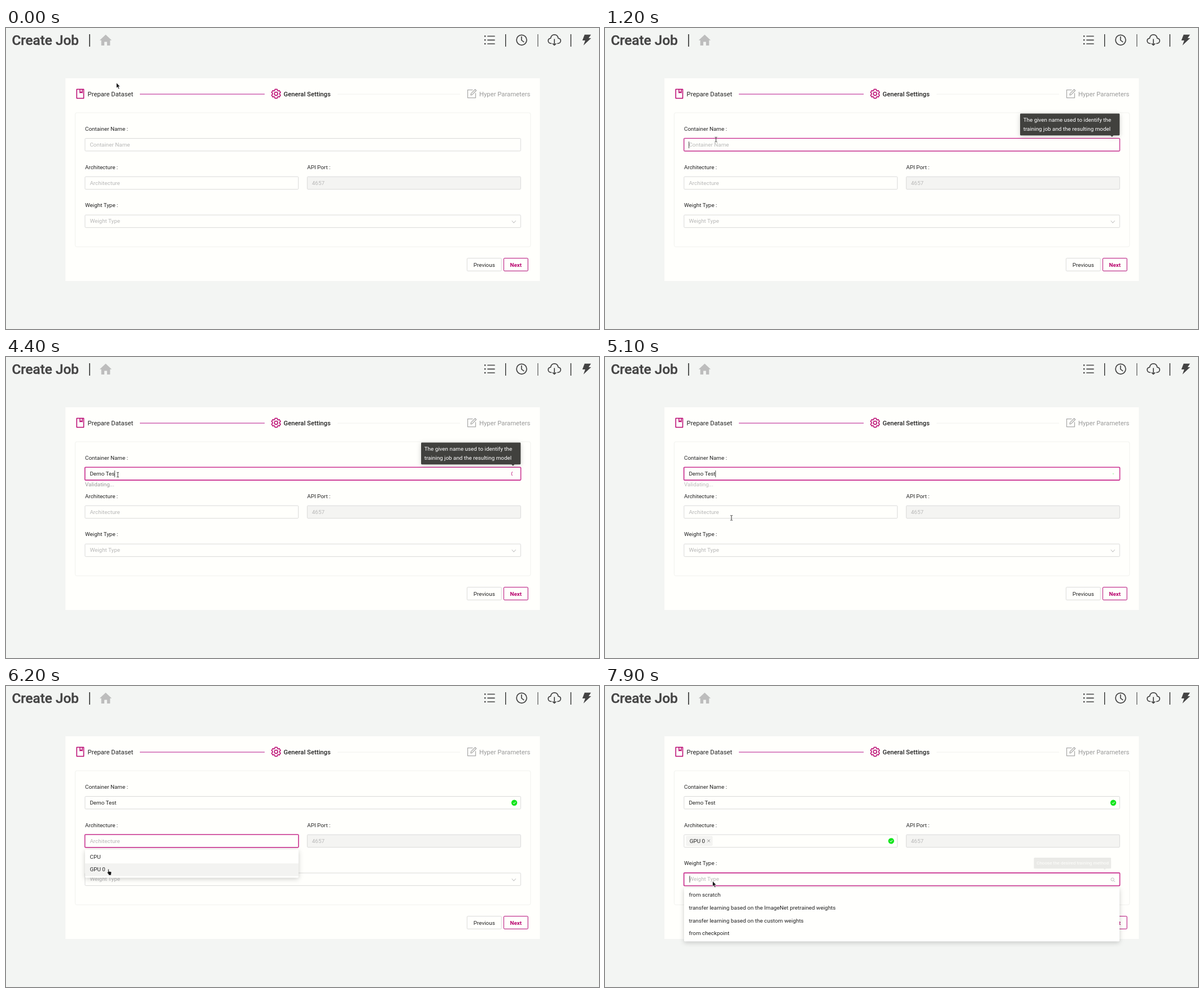
An HTML page that plays this animation: 1050 by 533 pixels, repeating every 8 s.

```html
<!DOCTYPE html>
<html lang="en">
<head>
<meta charset="utf-8">
<title>Create Job</title>
<style>
html, body { margin: 0; width: 100%; height: 100%; overflow: hidden; background: #f3f5f3; }
svg { display: block; width: 100vw; height: 100vh; font: 9.87px Roboto, sans-serif; fill: #222; }
.step { font-size: 11.28px; }
.bold { font-weight: 500; }
.hint { fill: #b8b8b8; }
.box { fill: #fffffc; stroke: #d6d6d6; stroke-width: .9; }
.pink { fill: none; stroke: #bf1280; }
.ring { fill: none; stroke: #cf3d97; stroke-width: 1.4; }
.line { fill: none; stroke: #444; stroke-width: 1.7; stroke-linejoin: round; stroke-linecap: round; }
.tip { fill: #41413e; filter: drop-shadow(0 2px 4px rgba(0,0,0,.18)); }
.tipText { fill: #fff; }
.menu { fill: #fffffd; filter: drop-shadow(0 2px 4px rgba(0,0,0,.2)); }
.caret { stroke: #222; stroke-width: .8; }
.pointer { stroke: #fff; stroke-width: .6; fill: #111; }
</style>
</head>
<body>
<svg id="stage" viewBox="0 0 1050 533"></svg>
<script>
const LOOP = 8000, LAST = 7900, STEP = 50;
const LEFT = 148.4;

const text = (x, y, s, cls = '') => `<text x="${x}" y="${y}" class="${cls}">${s}</text>`;
const rect = (x, y, w, h, cls, rx = 1.4) =>
  `<rect x="${x}" y="${y}" width="${w}" height="${h}" rx="${rx}" class="${cls}"/>`;

const field = (id, x, y, w) => rect(x, y, w, 22.3, 'box') +
  `<g id="${id}Hover">${rect(x, y, w, 22.3, 'pink')}</g>` +
  `<g id="${id}Focus" opacity="0">${rect(x - .4, y - .4, w + .8, 23.1, 'ring')}</g>`;

const check = (id, x, y) => `<g id="${id}" data-x="${x}" data-y="${y}">
  <circle cx="${x}" cy="${y}" r="5.2" fill="#12e51c"/>
  <path d="M${x - 2.1} ${y}l1.6 1.8 2.8-3.4" fill="none" stroke="#fff" stroke-width="1"/></g>`;

const tooltip = (id, x, y, w, h, lines) => `<g id="${id}" data-x="${x + w / 2}" data-y="${y + h / 2}">
  <path class="tip" d="M${x + 1.4} ${y}h${w - 2.8}q1.4 0 1.4 1.4v${h - 2.8}q0 1.4-1.4 1.4h-9.6l-2.6 2.6-2.6-2.6H${x + 1.4}q-1.4 0-1.4-1.4v${2.8 - h}q0-1.4 1.4-1.4z"/>
  ${lines.map((s, i) => text(x + 5.7, y + 14.7 + 15.5 * i, s, 'tipText')).join('')}</g>`;

const menu = (id, y, w, items, extra = '') => `<g id="${id}" data-y="${y}">
  ${rect(140, y, w, items.length * 22.55 + 4.4, 'menu')}${extra}
  ${items.map((s, i) => text(148.6, y + 15.8 + 22.55 * i, s)).join('')}</g>`;

// Six-toothed outline around the origin
const gear = () => {
  const points = [];
  for (let i = 0; i < 6; i++)
    for (const [turn, r] of [[-22, 6.3], [-14, 8.2], [14, 8.2], [22, 6.3]]) {
      const a = (i * 60 + turn - 90) * Math.PI / 180;
      points.push((r * Math.cos(a)).toFixed(2) + ',' + (r * Math.sin(a)).toFixed(2));
    }
  return `<polygon points="${points.join(' ')}"/><circle r="2.9"/>`;
};

const header = `
  <text x="10.4" y="30.4" font-size="24.3" class="bold" fill="#444" stroke="#444" stroke-width=".4">Create Job</text>
  <g fill="#222"><path d="M147.3 11h1.5v22h-1.5zM884 11h1.3v22h-1.3zM941.4 11h.9v22h-.9zM999.6 11h1.3v22h-1.3z"/></g>
  <path d="M176.5 11.8l10.6 10h-2.8v9.2h-5.4v-6.4h-4.8V31h-5.4v-9.2h-2.8z" fill="#bdbdbd"/>
  <g class="line">
    <path d="M853 14.5h12M853 21.3h12M853 28h12"/>
    <path d="M848 14.5h.4M848 21.3h.4M848 28h.4" stroke-width="2.4"/>
    <circle cx="913" cy="21.3" r="9"/><path d="M912.8 15.6v6l4 3"/>
    <path d="M965.6 27.5c-7-.4-7.300-8.400-1.200-9.400 1.600-8.200 11.800-8.200 13.400 0 6.100 1 5.800 9-1.200 9.400M971 20v10.300M968.300 27.800l2.700 2.700 2.700-2.700"/>
  </g>
  <path d="M1024.500 11.800h11.300l-4.200 6.100h4.500l-13.600 12.800 3.100-8.600h-5z" fill="#444"/>`;

const steps = `
  <g class="line" style="stroke:#b9056f;stroke-width:1.5">
    <path d="M125.300 108.500h12.300v15.900h-12.300zM131 108.500v6.300l2-1.500 2 1.500v-6.300"/>
    <g transform="translate(478.200 116.500)">${gear()}</g>
  </g>
  <path d="M237 117.200h221" stroke="#c545a2" stroke-width="1.200"/>
  <path d="M587 117.200h217" stroke="#f1f1ee"/>
  <path class="line" style="stroke:#aaa;stroke-width:1.300" d="M826 109.700h-8.500v14h14v-8M823 118.800l.4-2.700 7.300-7.300 2 2-7.300 7.300z"/>
  ${text(144.6, 121, 'Prepare Dataset', 'step')}
  ${text(491.5, 121, 'General Settings', 'step bold')}
  <g fill="#999">${text(838, 121, 'Hyper Parameters', 'step')}</g>`;

const form = `
  <rect x="122.500" y="150" width="806.300" height="237.500" rx="3" fill="none" stroke="#f1f2ee"/>
  ${text(140, 181.7, 'Container Name :')}${text(140, 249.5, 'Architecture :')}
  ${text(533.3, 249.5, 'API Port :')}${text(140, 317.4, 'Weight Type :')}
  ${field('name', 139.9, 195.5, 771.4)}
  ${field('arch', 139.9, 263.3, 377.8)}
  <rect x="533.400" y="263.300" width="377.900" height="22.300" rx="1.400" class="box" style="fill:#f4f4f2"/>
  ${field('weight', 139.9, 331.1, 771.4)}
  ${text(LEFT, 210, 'Container Name', 'hint')}
  <text id="typed" x="${LEFT}" y="210"></text>
  <g id="archHint">${text(LEFT, 277.8, 'Architecture', 'hint')}</g>
  ${text(541.8, 277.8, '4657', 'hint')}
  ${text(LEFT, 345.4, 'Weight Type', 'hint')}
  <path id="chevron" d="M895.800 341.200l3.400 4 3.400-4" fill="none" stroke="#b5b5b5"/>
  <path id="search" d="M900.700 344.700l2.200 2.200M901.300 342.500a2.700 2.700 0 1 1-5.400 0 2.700 2.700 0 1 1 5.400 0" fill="none" stroke="#b5b5b5" stroke-width=".9"/>
  <g id="tag">${rect(144, 266, 46, 16.6, 'chip')}${text(149.8, 277.7, 'GPU 0')}
    <path d="M181.300 271.900l4.600 4.600M185.900 271.900l-4.600 4.600" stroke="#777" stroke-width=".8"/></g>
  <circle id="spinner" cx="900" cy="206.700" r="4.800" fill="none" stroke="#c8388f" stroke-width="1" stroke-dasharray="7.540 30"/>
  <g id="validating" fill="#999">${text(140, 229, 'Validating...')}</g>
  ${check('nameCheck', 900, 206.8)}${check('archCheck', 506.7, 274.4)}
  <path id="nameCaret" class="caret" d="M0 201v12"/>
  <path id="weightCaret" class="caret" d="M150 336v12"/>
  ${rect(816.400, 407.700, 60.800, 22.500, 'box')}${text(827.8, 422.5, 'Previous')}
  ${rect(881.400, 407.700, 42.800, 22.500, 'box')}${rect(881.400, 407.700, 42.800, 22.500, 'pink')}
  <g fill="#b9056f" font-weight="700">${text(892.5, 422.5, 'Next')}</g>`;

const overlays =
  tooltip('nameTip', 735, 151.5, 176.3, 38.7, ['The given name used to identify the', 'training job and the resulting model']) +
  tooltip('weightTip', 744.5, 302, 166.5, 23.4, ['Choose the desired training method']) +
  menu('archMenu', 290, 378, ['CPU', 'GPU 0'], '<rect id="active" x="140" width="378" height="22.500" fill="#f3f3f1"/>') +
  menu('weightMenu', 357.6, 771, ['from scratch', 'transfer learning based on the ImageNet pretrained weights',
    'transfer learning based on the custom weights', 'from checkpoint']);

const cursors = `<g id="cursor">
  <path id="arrow" class="pointer" d="M0 0v9.300l2.100-1.900 1.700 3.700 1.600-.7-1.700-3.600h2.900z"/>
  <path id="beam" d="M-2-4.300q1.700 0 2 .8.300-.8 2-.8M0-3.500v7M-2 4.300q1.700 0 2-.8.300.8 2 .8" fill="none" stroke="#222" stroke-width=".9"/>
  <path id="hand" class="pointer" d="M-1 .3q1-1 1.700 0v3.500l3.600.6q1 .3.900 1.400l-.6 3v1.800h-4.300v-1.300l-2.800-3.500q0-1.200 1.500-.4z"/></g>`;

const stage = document.getElementById('stage');
stage.innerHTML = `<rect width="1050" height="533" fill="#f3f5f3"/>${header}
  <rect x="105.300" y="89" width="840" height="359" fill="#fffffc"/>${steps}${form}${overlays}${cursors}`;
const el = {};
stage.querySelectorAll('[id]').forEach(n => el[n.id] = n);
stage.querySelector('.chip').style.cssText = 'fill:#f4f4f2;stroke:#eeeeec;stroke-width:.7';
const nameHint = el.typed.previousElementSibling;

const path = [[400, 195.5, 97], [1000, 196.5, 196.500], [1200, 196.5, 197.500], [1350, 198, 208.5],
  [4850, 198, 208.5], [5150, 226, 291], [5500, 240.5, 275], [5900, 240.5, 275], [6200, 181.5, 324.5],
  [6700, 181.5, 324.5], [7300, 194.5, 348], [7450, 194.5, 348], [7900, 190.5, 345.5]];
const keys = [1800, 2000, 2250, 2500, 2800, 3050, 3350, 4000, 4800];

const ramp = (t, a, d) => Math.max(0, Math.min(1, (t - a) / d));
const span = (t, a, b, d) => Math.min(ramp(t, a, d), 1 - ramp(t, b, d));
const show = (n, v) => n.setAttribute('opacity', +v);
const blink = (t, from) => t >= from && (t - from) % 1000 < 500;

function zoom(n, v, low) {
  const { x, y } = n.dataset, s = low + (1 - low) * v;
  n.setAttribute('transform', `translate(${x} ${y}) scale(${s}) translate(${-x} ${-y})`);
  show(n, v);
}
function slide(n, v) {
  const y = +n.dataset.y, s = .8 + .2 * v;
  n.setAttribute('transform', `translate(0 ${y * (1 - s)}) scale(1 ${s})`);
  show(n, v);
}
function locate(t) {
  const i = path.findIndex(p => p[0] > t);
  if (i < 0) return path[path.length - 1].slice(1);
  if (!i) return path[0].slice(1);
  const a = path[i - 1], b = path[i];
  const k = ramp(t, a[0], b[0] - a[0]), e = k * k * (3 - 2 * k);
  return [a[1] + (b[1] - a[1]) * e, a[2] + (b[2] - a[2]) * e];
}

function draw(t) {
  const [x, y] = locate(t);
  const inside = top => y >= top && y <= top + 22.6;
  const choosing = t >= 5900 && t < 6900;
  const shape = choosing && y > 290 ? 'hand' : inside(195.4) || inside(263) ? 'beam' : 'arrow';
  for (const s of ['arrow', 'beam', 'hand']) show(el[s], s === shape);
  el.cursor.setAttribute('transform', `translate(${x} ${y})`);

  show(el.nameHover, span(t, 950, 5900, 200));
  show(el.nameFocus, span(t, 1100, 5900, 200));
  show(el.archHover, .6 * span(t, 5300, 6900, 200));
  show(el.archFocus, span(t, 5900, 6900, 200));
  show(el.weightHover, ramp(t, 7150, 200));
  show(el.weightFocus, ramp(t, 7650, 200));

  const count = keys.filter(k => k <= t).length;
  el.typed.textContent = 'Demo Test'.slice(0, count);
  show(nameHint, !count);
  const width = count ? el.typed.getComputedTextLength() + (count === 5 ? 2.4 : 0) : 0;
  el.nameCaret.setAttribute('transform', `translate(${LEFT + .2 + width} 0)`);
  show(el.nameCaret, t < 5900 && blink(t, count ? keys[count - 1] : 1150));

  show(el.spinner, t >= 1800 && t < 5050);
  el.spinner.setAttribute('transform', `rotate(${(t - 1775) * .36 - 90} 900 206.7)`);
  show(el.validating, span(t, 1800, 5050, 150));
  zoom(el.nameCheck, ramp(t, 5050, 200), 0);
  zoom(el.nameTip, span(t, 1050, 5000, 100), .8);

  slide(el.archMenu, span(t, 5900, 6850, 200));
  show(el.active, y > 291);
  el.active.setAttribute('y', y > 314 ? 314.2 : 291.700);
  show(el.archHint, t < 6650);
  show(el.tag, t >= 6650);
  zoom(el.archCheck, ramp(t, 6700, 200), 0);

  zoom(el.weightTip, span(t, 7250, 7810, 100), .8);
  slide(el.weightMenu, ramp(t, 7650, 200));
  show(el.chevron, t < 7650);
  show(el.search, t >= 7650);
  show(el.weightCaret, blink(t, 7650));
}

function frame() {
  const t = performance.now() % LOOP;
  draw(Math.min(LAST, Math.floor(t / STEP) * STEP));
  requestAnimationFrame(frame);
}
frame();
</script>
</body>
</html>
```
